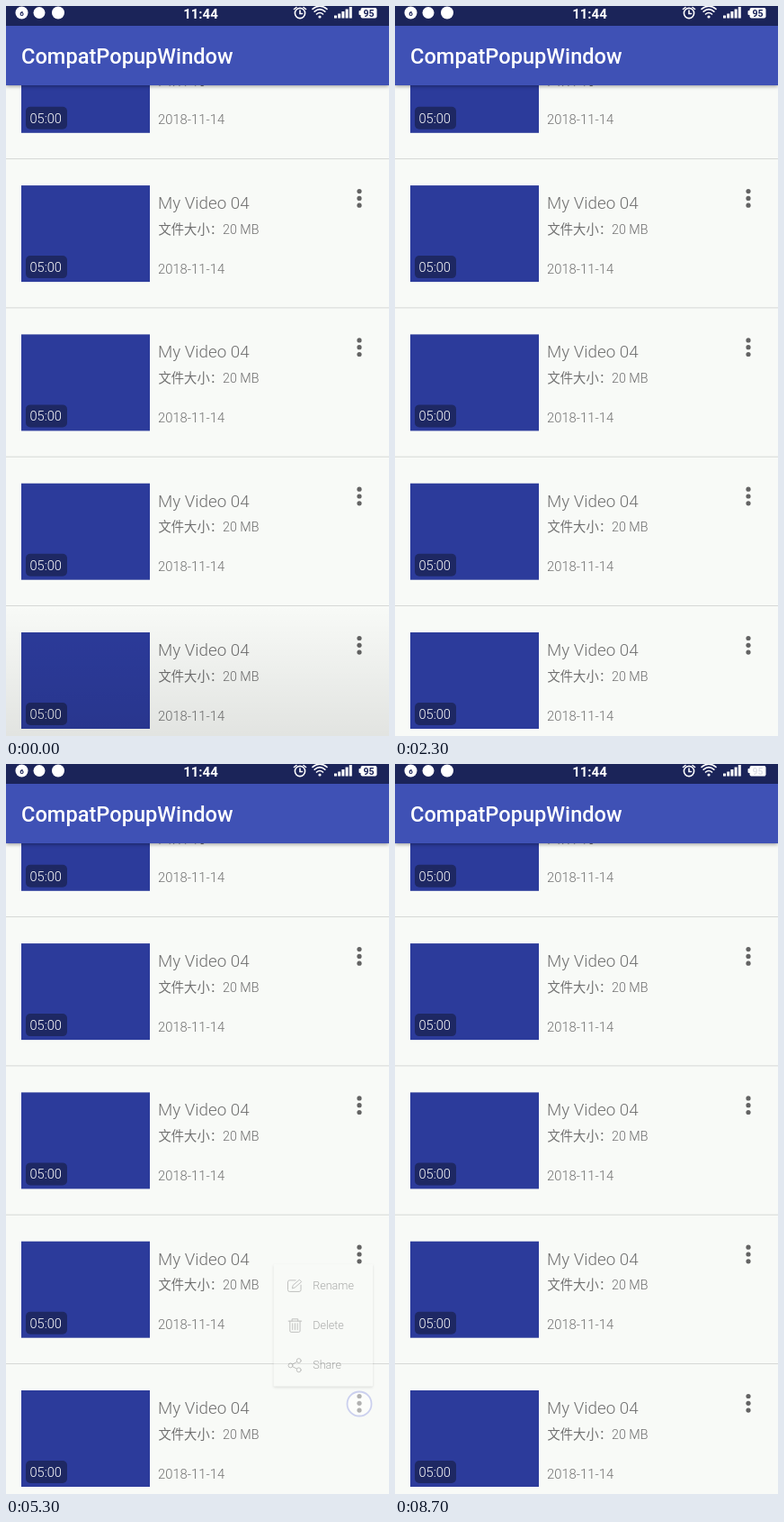
An HTML page that plays this animation: 426x810 px, repeating every 8800 ms.

```html
<!DOCTYPE html>
<html lang="zh-CN">
<head>
<meta charset="utf-8">
<style>
  html, body { margin: 0; width: 100%; height: 100%; overflow: hidden; background: #f8faf7; }
  svg { display: block; width: 426px; height: 810px; font-family: Roboto, "Noto Sans CJK SC", "Noto Sans CJK", sans-serif; font-weight: 300; }
  .line { fill: none; stroke: #5c5c5c; stroke-width: 1.5; stroke-linejoin: round; stroke-linecap: round; }
  .white { fill: none; stroke: #fff; stroke-width: 1.6; stroke-linecap: round; }
  #bar { filter: drop-shadow(0 1px 2px rgba(0, 0, 0, .4)); }
  #panel { filter: drop-shadow(0 2px 2.5px rgba(0, 0, 0, .33)); }
</style>
</head>
<body>
<svg viewBox="0 0 426 810">
  <defs>
    <linearGradient id="shade" x2="0" y2="1">
      <stop stop-opacity="0"/>
      <stop offset="1" stop-opacity=".09"/>
    </linearGradient>
    <g id="row">
      <path d="M0 165.3H426" stroke="#d6d8d6"/>
      <rect x="17" y="29.5" width="143" height="107" fill="#2c3b9b"/>
      <rect x="22" y="107.5" width="46" height="25" rx="5" fill="#1e2863"/>
      <text x="26.5" y="125.5" font-size="14.6" fill="#fff">05:00</text>
      <g fill="#707070">
        <text x="169" y="55.5" font-size="18.8">My Video 04</text>
        <text x="169.5" y="83" font-size="14.3">文件大小：20 MB</text>
        <text x="169" y="127" font-size="14.8">2018-11-14</text>
      </g>
      <g fill="#636363">
        <circle cx="393" cy="36" r="2.6"/>
        <circle cx="393" cy="43.8" r="2.6"/>
        <circle cx="393" cy="51.6" r="2.6"/>
      </g>
    </g>
  </defs>

  <rect width="426" height="810" fill="#f8faf7"/>
  <g id="rows"></g>
  <rect id="dim" y="665" width="426" height="145" fill="url(#shade)"/>

  <rect id="bar" width="426" height="88" fill="#3f51b5"/>
  <rect width="426" height="22" fill="#1b2459"/>
  <text x="17" y="64" font-size="23.6" font-weight="500" fill="#fff">CompatPopupWindow</text>

  <g fill="#fff">
    <circle cx="17.500" cy="7.500" r="7"/>
    <circle cx="37" cy="7.500" r="6.500"/>
    <circle cx="58" cy="7.500" r="7"/>
    <text x="216.500" y="14" font-size="15" font-weight="700" text-anchor="middle">11:44</text>
    <path d="M365 10.500h3v3h-3zM369.200 8.500h3v5h-3zM373.400 6h3v7.500h-3zM377.600 3.500h3v10h-3zM381.800 1h3v12.500h-3z"/>
    <rect x="392.500" y="5" width="4" height="5" rx="1"/>
    <rect x="394.500" y="2" width="18" height="11.500" rx="2"/>
    <circle cx="349" cy="12" r="1.600"/>
  </g>
  <g class="white">
    <circle cx="327" cy="8" r="5.600"/>
    <path d="M327 5v3.500h2.500M320.500 3.500l2.500-2M333.500 3.500l-2.500-2M345.500 9q3.500-3 7 0M343.200 6.200q5.800-5 11.600 0M341 3.400q8-6.500 16 0"/>
  </g>
  <g fill="#1b2459" font-weight="700" text-anchor="middle">
    <text x="17.500" y="10.500" font-size="8">6</text>
    <text id="charge" x="403.500" y="11.500" font-size="10.500">95</text>
  </g>

  <g id="popup">
    <g id="panel"><rect width="167" height="205" rx="2" fill="#fafbf9"/></g>
    <g class="line">
      <path d="M37 27H27a3 3 0 0 0-3 3V43a3 3 0 0 0 3 3H43a3 3 0 0 0 3-3V35M31.500 40l1-4.500L43.500 26l3.500 3.500-11 9.500z"/>
      <path d="M25 95.500H47M31 95.500v-3.500h10v3.500M27.500 95.500V112a2 2 0 0 0 2 2h13a2 2 0 0 0 2-2V95.500M32 99.500v10.500M36 99.500v10.500M40 99.500v10.500"/>
      <circle cx="28.500" cy="170" r="3.700"/>
      <circle cx="42.500" cy="162" r="3.700"/>
      <circle cx="42.500" cy="177.500" r="3.700"/>
      <path d="M31.700 168.200L39.300 163.800M31.700 171.800L39.300 175.800"/>
    </g>
    <g font-size="19" fill="#222">
      <text x="66" y="42.500">Rename</text>
      <text x="66" y="109">Delete</text>
      <text x="66" y="175.500">Share</text>
    </g>
  </g>
  <circle id="touch" r="13.500" fill="#fff" fill-opacity=".5" stroke="#cbd0ee" stroke-width="1.800"/>
</svg>

<script>
const LOOP = 8800, STEP = 100, PITCH = 165.3;
const $ = id => document.getElementById(id);
const clamp = v => Math.min(1, Math.max(0, v));
const easeOut = v => 1 - (1 - v) ** 2;

// Each menu: opening tap, dismissing tap, panel top, scale origin, tap places
const menus = [
  { open: 50, close: 1550, top: 227, pivot: 0, dots: 213, away: [349, 507] },
  { open: 3050, close: 4240, top: 558, pivot: 0, dots: 544, away: [330, 783] },
  { open: 5150, close: 6140, top: 485.5, pivot: 205, dots: 710, away: [356, 407] },
  { open: 7350, close: 8050, top: 485.5, pivot: 205, dots: 708, away: [352, 430] }
];

$("rows").innerHTML = [0, 1, 2, 3, 4]
  .map(i => `<use href="#row" y="${4.3 + i * PITCH}"/>`).join("");

function placePopup(t, menu) {
  const shown = t < menu.close
    ? easeOut(clamp((t - menu.open - 100) / 250))
    : 1 - clamp((t - menu.close) / 200);
  const scale = .47 + .53 * shown;
  $("popup").setAttribute("opacity", shown);
  $("popup").setAttribute("transform",
    `translate(408 ${menu.top + menu.pivot}) scale(${scale}) translate(-167 ${-menu.pivot})`);
}

function placeTouch(t, menu) {
  const leaving = t >= menu.close;
  const age = t - (leaving ? menu.close : menu.open);
  const [x, y] = leaving ? menu.away : [393, menu.dots];
  $("touch").setAttribute("transform", `translate(${x} ${y})`);
  $("touch").setAttribute("opacity", age < 0 ? 0 : 1 - clamp((age - 180) / 120));
}

// The battery figure fades out and back in at a steady beat
function chargeOpacity(t) {
  const beat = (t - 980 + 2355) % 2355;
  if (t < 980) return 1;
  return beat < 600 ? 1 - clamp(beat / 340) : clamp((beat - 600) / 400);
}

function draw(now) {
  const t = Math.floor(now % LOOP / STEP) * STEP;
  const menu = menus.findLast(m => m.open <= t) || menus[0];
  placePopup(t, menu);
  placeTouch(t, menu);
  $("charge").setAttribute("opacity", chargeOpacity(t));
  $("dim").setAttribute("opacity", 1 - clamp(t / 400));
}

const start = performance.now();
function tick() {
  draw(performance.now() - start);
  requestAnimationFrame(tick);
}
tick();
</script>
</body>
</html>
```
